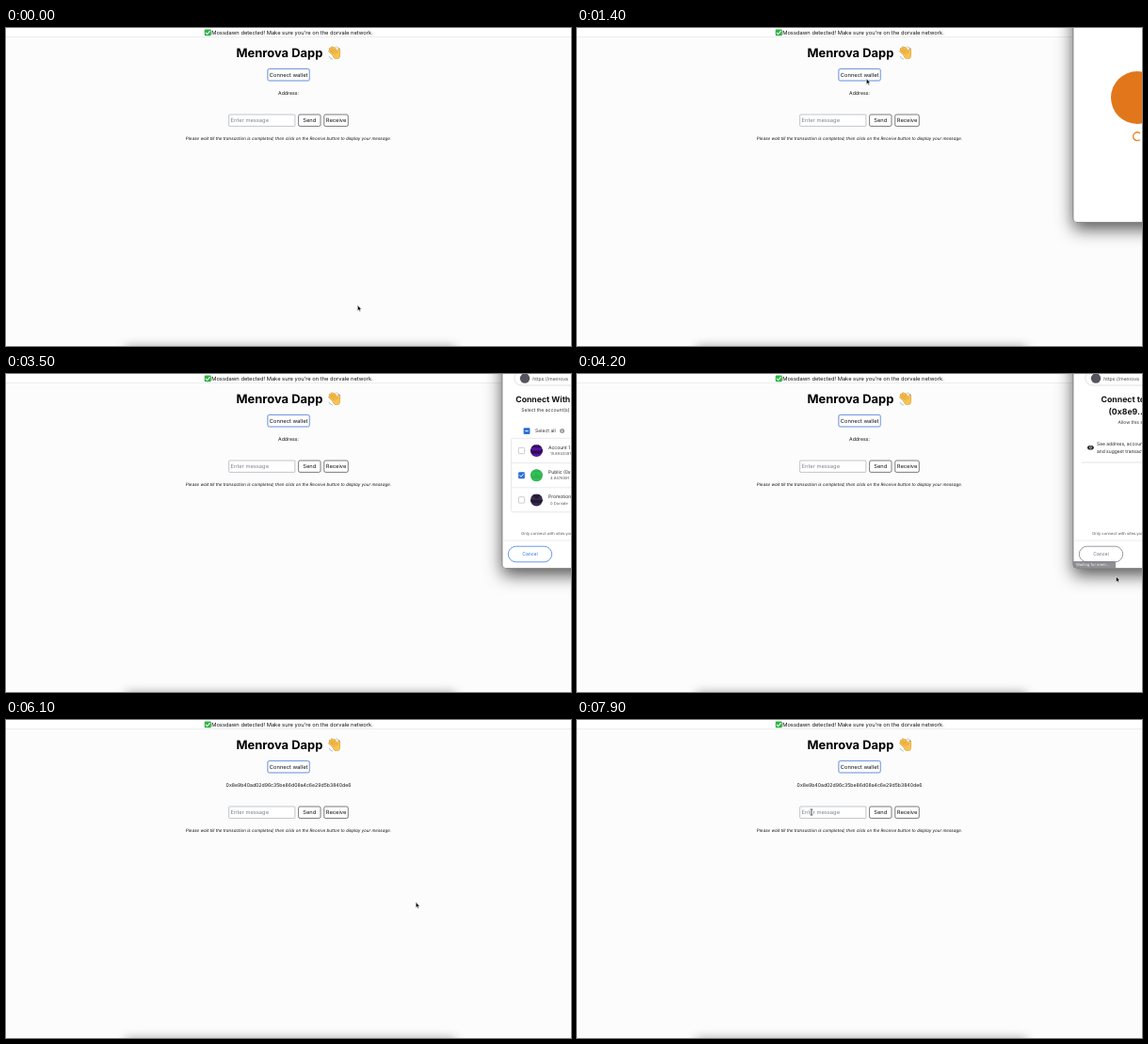
Animation, 600 px wide and 338 px high, one loop 8 s. Source, as an HTML page with a canvas:

```html
<!DOCTYPE html>
<html lang="en">
<head>
<meta charset="utf-8">
<title>Wallet connect</title>
<style>
  html, body { margin: 0; width: 100%; height: 100%; overflow: hidden; background: #fcfcfd; }
  canvas { display: block; width: 600px; height: 338px; }
</style>
</head>
<body>
<canvas id="stage"></canvas>
<script>
const W = 600, H = 338, LOOP = 8000, STEP = 100;
const canvas = document.getElementById('stage');
const ctx = canvas.getContext('2d');
const dpr = window.devicePixelRatio || 1;
canvas.width = W * dpr;
canvas.height = H * dpr;

const WALLET = '0x8e9b40ad02d96c35be86d08a4c6e29d5b3840de6';
const BLUE = '#2a6fdb', ORANGE = '#f08024', GREEN = '#28a745';

// Pointer stops: time, x, y of the tip
const PATH = [
  [0, 373.3, 294.6], [100, 371, 288], [500, 335, 150], [900, 307.3, 53.7],
  [1800, 307.3, 53.7], [2100, 390, 120], [2400, 498, 195.2], [2700, 606, 195],
  [3800, 606, 200], [4200, 572.4, 215], [4500, 606, 198],
  [4900, 606, 196], [5100, 554, 193.3], [5400, 553.7, 193.3], [6000, 435.2, 193.5],
  [6600, 435.2, 193.5], [7000, 375, 168], [7500, 262, 118], [7900, 249, 98], [8000, 249, 98]
];

const lerp = (a, b, k) => a + (b - a) * k;

function pointerAt(t) {
  const i = PATH.findIndex(p => p[0] > t);
  const [t0, x0, y0] = PATH[i - 1], [t1, x1, y1] = PATH[i];
  const k = (t - t0) / (t1 - t0);
  return [lerp(x0, x1, k), lerp(y0, y1, k)];
}

function text(str, x, y, size, { color = '#111', style = '', align = 'left' } = {}) {
  ctx.font = `${style} ${size}px Inter, sans-serif`;
  ctx.textAlign = align;
  ctx.fillStyle = color;
  ctx.fillText(str, x, y);
}

function paint(fill, stroke, width = 0.6) {
  if (fill) { ctx.fillStyle = fill; ctx.fill(); }
  if (stroke) { ctx.strokeStyle = stroke; ctx.lineWidth = width; ctx.stroke(); }
}

function box(x, y, w, h, r, fill, stroke, width) {
  ctx.beginPath();
  ctx.roundRect(x, y, w, h, r);
  paint(fill, stroke, width);
}

function disc(x, y, r, fill, stroke, width) {
  ctx.beginPath();
  ctx.arc(x, y, r, 0, Math.PI * 2);
  paint(fill, stroke, width);
}

function line(points, color, width) {
  ctx.beginPath();
  points.forEach(([x, y]) => ctx.lineTo(x, y));
  paint(null, color, width);
}

function tick(x, y, s, color = '#fff') {
  line([[x - s, y], [x - s * 0.25, y + s * 0.75], [x + s, y - s * 0.75]], color, s * 0.45);
}

function shadow(color, blur, dy) {
  ctx.shadowColor = color;
  ctx.shadowBlur = blur * dpr;
  ctx.shadowOffsetY = dy * dpr;
}

function wavingHand() {
  const fingers = [[-5.2, -1.6, 0.2, 3.2], [-4.8, -4.2, 1.2, 1.6], [-2.6, -5.4, 2.6, 0.8], [0, -4.6, 3.6, 1]];
  const thumb = [[4.8, -3.4], [5, 0], [4, 3]];
  ctx.save();
  ctx.translate(348.9, 26.2);
  ctx.lineCap = ctx.lineJoin = 'round';
  [['#c98a2b', 0.7], ['#f9c350', 0]].forEach(([color, grow]) => {
    fingers.forEach(([a, b, c, d]) => line([[a, b], [c, d]], color, 1.8 + grow));
    line(thumb, color, 1.8 + grow);
    ctx.beginPath();
    ctx.ellipse(1.8, 2.6, 3.5 + grow / 2, 4.2 + grow / 2, -0.7, 0, 7);
    paint(color);
  });
  line([[-4.1, -2.3], [0.4, 2]], '#c98a2b', 0.5);
  line([[-3.1, -4], [1.4, 0.8]], '#c98a2b', 0.5);
  line([[-0.7, -4.2], [2.8, 0.3]], '#c98a2b', 0.5);
  const arc = (x, y, r, a, b) => {
    ctx.beginPath();
    ctx.arc(x, y, r, a, b);
    paint(null, '#7aa0b8', 0.6);
  };
  arc(1, -2, 4.5, -1.35, -0.4);
  arc(-1.5, 2.5, 4.5, 1.75, 2.8);
  ctx.restore();
}

function button(label, x, y, w, border, width) {
  box(x, y, w, 12.4, 1.6, '#fff', border, width);
  text(label, x + w / 2, y + 8.3, 5.76, { align: 'center' });
}

function page(connected) {
  ctx.fillStyle = '#fcfcfd';
  ctx.fillRect(0, 0, W, H);
  ctx.fillStyle = '#fff';
  ctx.fillRect(0, 0, W, 9);
  ctx.fillStyle = '#e4e4e7';
  ctx.fillRect(0, 9, W, 0.6);

  box(210.8, 1.4, 7, 6.8, 1, '#2fb344');
  tick(214.3, 4.8, 2.3);
  text("Mossdawn detected! Make sure you're on the dorvale network.", 218.2, 6.9, 5.76);
  text('Menrova Dapp', 244.4, 31.1, 12.96, { style: 'bold', color: '#000' });
  wavingHand();

  box(277.6, 43.1, 45, 13.2, 2, null, '#c3d6f8', 0.8);
  button('Connect wallet', 278, 43.5, 44.2, '#4574cc', 0.7);
  text(connected ? WALLET : 'Address:', 300, 71.2, 5.2, { align: 'center' });

  box(236.7, 92, 70.2, 12.4, 0.8, '#fff', '#9a9ea6');
  text('Enter message', 238.6, 100.3, 5.76, { color: '#7f848c' });
  button('Send', 310.6, 92, 23.4, '#222');
  button('Receive', 337.8, 92, 25.5, '#222');
  text('Please wait till the transaction is completed, then click on the Receive button to display your message.',
    300, 118.5, 4.53, { style: 'italic', align: 'center' });

  ctx.save();
  shadow('rgba(0,0,0,.36)', 11, 0);
  ctx.fillStyle = '#888';
  ctx.fillRect(127, H + 0.5, 350, 30);
  ctx.restore();
}

function siteBar() {
  box(539.8, -3, 110, 15, 7.5, '#fff', '#c9ccd1');
  disc(551, 4.6, 5.2, '#55555f');
  text('https://menrova', 559.3, 6.6, 5, { color: '#444' });
}

function footer(border) {
  text('Only connect with sites you trust', 547, 170.6, 4.2, { color: '#555' });
  line([[527, 177], [W, 177]], '#dfe1e4', 0.6);
  box(533.3, 183.2, 46.4, 16.6, 8.3, '#fff', border, 0.7);
  text('Cancel', 556.5, 193.3, 5, { color: border, align: 'center' });
}

function avatar(x, y, base, spots, seed) {
  ctx.save();
  disc(x, y, 6.5, base);
  ctx.clip();
  ctx.fillStyle = spots;
  for (let i = 0; i < 32; i++) {
    if (Math.sin(i * 12.99 + seed) * 437.5 % 1 > 0.1) {
      const dx = (i % 4) * 1.65, dy = Math.floor(i / 4) * 1.65 - 6.6;
      ctx.fillRect(x + dx, y + dy, 1.65, 1.65);
      ctx.fillRect(x - dx - 1.65, y + dy, 1.65, 1.65);
    }
  }
  ctx.restore();
}

function loadingView(t) {
  disc(595, 74, 28, '#e2761b');
  const a = t / 1000 * Math.PI * 2 - 1.6;
  ctx.beginPath();
  ctx.arc(595, 115.3, 4.4, a, a + 4.5);
  paint(null, ORANGE, 1.3);
}

function accountsView() {
  siteBar();
  text('Connect With', 541.2, 30, 8.7, { style: 'bold' });
  text('Select the account(s)', 547.2, 39.7, 5.1, { color: '#333' });
  box(549.6, 57.2, 6.8, 6.8, 1, BLUE);
  line([[551.3, 60.6], [554.7, 60.6]], '#fff', 1);
  text('Select all', 562, 62.3, 5.1, { color: '#333' });
  disc(590.6, 60.5, 2.5, '#9a9da2');
  text('i', 590.6, 62, 4, { color: '#fff', align: 'center', style: 'bold' });

  box(536.5, 68.3, 120, 78.4, 2, null, '#d9dbdf');
  const rows = [
    ['Account 1', '15.8943381', '#5a12a8', '#23103c'],
    ['Public (0x', '4.9476591', '#2fb350', '#35c158'],
    ['Promotion', '0 Dorvale', '#3a2a55', '#1f1a26']
  ];
  rows.forEach(([name, amount, base, spots], i) => {
    const y = 81.5 + i * 26.2, checked = i === 1;
    if (i) line([[536.5, y - 13.1], [W, y - 13.1]], '#d9dbdf', 0.6);
    box(544.3, y - 3.2, 6.4, 6.4, 1, checked ? BLUE : '#fff', checked ? BLUE : '#a5a9b0');
    if (checked) tick(547.5, y, 2);
    avatar(563.4, y, base, spots, i * 3);
    text(name, 576, y - 1.8, 5, { color: '#222' });
    text(amount, 578, y + 4.6, 4.1, { color: '#555' });
  });
  footer(BLUE);
}

function permissionView(waiting) {
  siteBar();
  text('Connect to', 556.6, 30, 8.7, { style: 'bold' });
  text(`(${WALLET.slice(0, 5)}...`, 564.6, 42.7, 8.7, { style: 'bold' });
  text('Allow this site', 574.6, 52.6, 4.9, { color: '#333' });
  ctx.beginPath();
  ctx.ellipse(545.4, 78.2, 3.4, 2.3, 0, 0, 7);
  paint('#222');
  disc(545.4, 78.2, 1.1, '#222', '#fff', 0.6);
  text('See address, account', 552, 76.2, 4.95, { color: '#222' });
  text('and suggest transactions', 552, 83.7, 4.95, { color: '#222' });
  line([[536, 94], [W, 94]], '#cfd2d6', 0.6);
  footer('#6a6f76');
  if (waiting) {
    box(527, 199, 45, 7.6, [0, 1.5, 0, 3], 'rgba(125,125,128,.85)');
    text('Waiting for menr...', 530, 204.2, 4.1, { color: '#eee' });
  }
}

function connectedView() {
  text('Connecting', 566, 60.6, 9.3, { color: '#222' });
  ctx.save();
  ctx.setLineDash([2, 2]);
  line([[571, 81.8], [W, 81.8]], '#c5c8cc', 0.6);
  ctx.restore();
  disc(558.7, 81.8, 11.4, '#fff', '#d5d7da', 0.6);
  disc(558.7, 81.8, 9, '#50505a');
  disc(595, 81.8, 6.4, GREEN);
  tick(595, 81.8, 3);
}

function popup(t) {
  ctx.save();
  shadow('rgba(0,0,0,.68)', 18, 7);
  box(527, -60, 136, 266.5, 3.6, '#fff');
  ctx.restore();
  box(527, -60, 136, 266.5, 3.6, '#fff', '#6e6e6e', 0.7);
  if (t < 1900) loadingView(t);
  else if (t < 3800) accountsView();
  else if (t < 4900) permissionView(t >= 4000 && t < 4500);
  else connectedView();
}

function arrow(x, y) {
  ctx.beginPath();
  [[0, 0], [0, 6.2], [1.4, 5], [2.3, 7], [3.3, 6.5], [2.4, 4.6], [4.2, 4.5]]
    .forEach(([dx, dy]) => ctx.lineTo(x + dx, y + dy));
  ctx.closePath();
  paint('#000', '#fff', 0.6);
}

function textCursor(x, y) {
  [['#fff', 1.4], ['#222', 0.7]].forEach(([color, width]) => {
    line([[x, y - 3], [x, y + 3]], color, width);
    [-3, 3].forEach(dy => line([[x - 1.4, y + dy], [x + 1.4, y + dy]], color, width));
  });
}

function draw(t) {
  ctx.setTransform(dpr, 0, 0, dpr, 0, 0);
  ctx.textRendering = 'geometricPrecision';
  page(t >= 4900);
  if (t >= 1100 && t < 5800) popup(t);
  const [x, y] = pointerAt(t);
  const overInput = x > 237 && x < 307 && y > 92 && y < 104;
  (overInput ? textCursor : arrow)(x, y);
}

const start = performance.now();
function frame() {
  const t = Math.max(0, performance.now() - start) % LOOP;
  draw(Math.floor(t / STEP) * STEP);
  requestAnimationFrame(frame);
}
frame();
</script>
</body>
</html>
```
